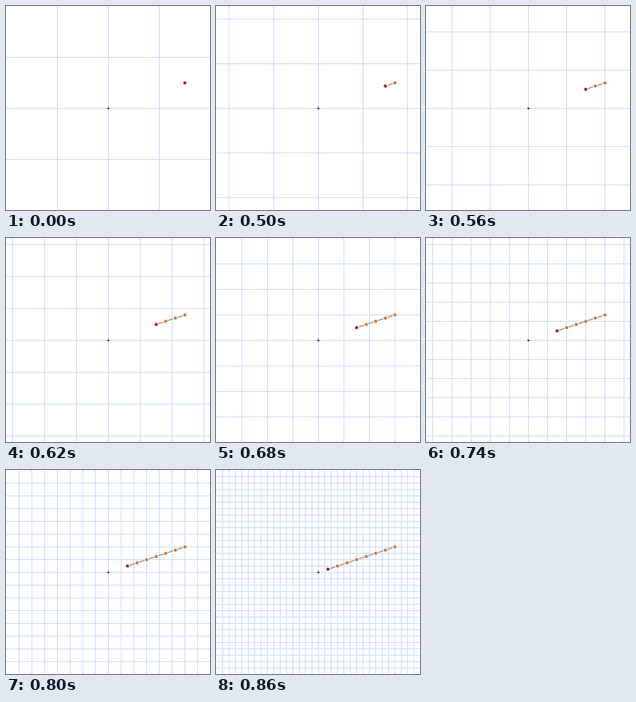
Animation of 256x256 px, one loop 1.36 s. Source, as a matplotlib script:

```python
import numpy as np
import matplotlib.pyplot as plt
from matplotlib.animation import FuncAnimation
from matplotlib.collections import LineCollection
from matplotlib.patches import Circle

SIZE, DPI = 256, 64
PX = 72 / DPI  # points per pixel
STEP_MS = 20
LOOP_MS = 1360
STEPS = 8
CENTER = 128
START = np.array([224, 96])
MOVE = np.array([-12, 4])
ORANGE, RED, NAVY = "#e2701e", "#a91e2c", "#0a2350"

# integer coordinates are pixel centres
fig = plt.figure(figsize=(SIZE / DPI, SIZE / DPI), dpi=DPI, facecolor="white")
ax = fig.add_axes([0, 0, 1, 1])
ax.set_xlim(-0.5, SIZE - 0.5)
ax.set_ylim(SIZE - 0.5, -0.5)
ax.axis("off")

grid = LineCollection([], colors="#ccddff", linewidths=PX, zorder=1)
grid.set_snap(False)
ax.add_collection(grid)
path, = ax.plot([], [], color="#8294a0", lw=1.3 * PX, zorder=2)


def dot(center, radius, color, zorder):
    return ax.add_patch(Circle(center, radius, fc=color, ec="none", zorder=zorder))


points = START + np.outer(np.arange(STEPS), MOVE)
halos = [dot(p, 3, "white", 3) for p in points]
cores = [dot(p, 2, ORANGE, 4) for p in points]
origin = dot((CENTER, CENTER), 1.2, NAVY, 5)


def grid_lines(gap):
    marks = np.arange(CENTER % gap or gap, SIZE, gap)
    across = [[(-1, m), (SIZE, m)] for m in marks]
    down = [[(m, -1), (m, SIZE)] for m in marks]
    return across + down


def draw(frame):
    # hold the first step, refine every 60 ms, hold the last
    step = int(np.clip((frame * STEP_MS - 440) // 60, 0, STEPS - 1))
    grid.set_segments(grid_lines(64 - 8 * step))
    path.set_data(*points[:step + 1].T)
    for i, (halo, core) in enumerate(zip(halos, cores)):
        halo.set_visible(i <= step)
        core.set_visible(i <= step)
        core.set_facecolor(RED if i == step else ORANGE)
    return grid, path, *halos, *cores, origin


anim = FuncAnimation(fig, draw, frames=LOOP_MS // STEP_MS, interval=STEP_MS,
                     repeat=True, repeat_delay=0)
plt.show()
```
